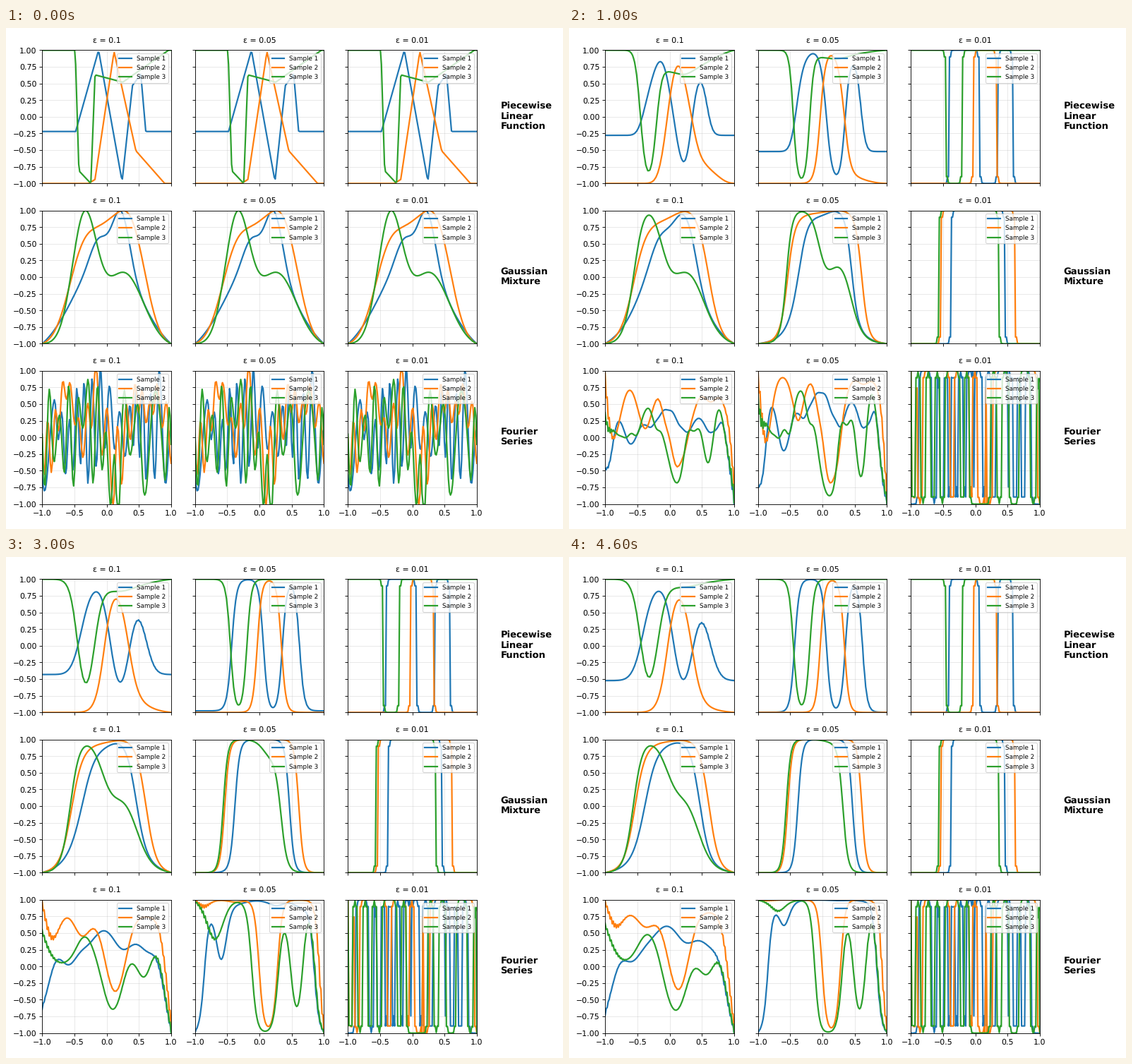
Recreate the animation shown at these times as a matplotlib script. Size 789x710 px, loop 5000 ms.

```python
import numpy as np
import matplotlib.pyplot as plt
from matplotlib.animation import FuncAnimation

W, H, DPI = 789, 710, 78.9
EPS = [0.1, 0.05, 0.01]
NAMES = ["Piecewise\nLinear\nFunction", "Gaussian\nMixture", "Fourier\nSeries"]
STEPS, DT = 100, 2.5e-5
X = np.linspace(-1, 1, 128)
DX = X[1] - X[0]


def linear(*points):
    return np.interp(X, *zip(*points))


def eased(*points):
    """Ease in and out between a few turning points."""
    xs, ys = np.transpose(points)
    pos = np.interp(X, xs, np.arange(len(xs)))
    t = pos % 1
    return np.interp(np.floor(pos) + t * t * (3 - 2 * t), np.arange(len(ys)), ys)


def mixture(*parts):
    """Sum of (weight, centre, width) bells, scaled to [-1, 1], -1 at both ends."""
    v = sum(w * np.exp(-((X - c) / s) ** 2 / 2) for w, c, s in parts)
    v = v - linear((-1, v[0]), (1, v[-1]))
    return 2 * v / v.max() - 1


def wave(mid, half_turns, amp, beat, centre, period):
    """Fast oscillation of drifting pitch and beating strength around mid."""
    size = amp + beat * np.cos(2 * np.pi * (X - centre) / period)
    return np.clip(mid - size * np.cos(np.pi * half_turns), -1, 1)


piecewise = [
    linear((-1, -.22), (-.48, -.22), (-.125, 1), (.24, -.97), (.4, .47),
           (.53, .64), (.607, -.22), (1, -.22)),
    linear((-.28, -1), (-.18, -.94), (.115, .98), (.454, -.51), (.9, -1)),
    linear((-.487, 1), (-.43, -.81), (-.245, -1), (-.18, .63), (.25, .52), (.96, 1)),
]
gaussian = [
    mixture((1.55, 0, .5), (.79, .23, .13), (.27, -.14, .12)),
    mixture((1.38, -.35, .24), (1.13, .05, .218), (1.55, .4, .22)),
    mixture((1.88, -.345, .19), (1.1, .27, .3)),
]
fourier = [
    wave(eased((-1, -.4), (-.77, .3), (-.62, -.2), (-.4, .25), (-.31, .05),
               (-.06, .4), (.28, .02), (.46, .3), (.67, -.05), (.82, .3), (1, -.4)),
         linear((-1, -.4), (-.95, 0), (-.81, 1), (-.29, 10), (-.03, 14),
                (.36, 19), (.61, 24), (.815, 27), (1, 29)),
         .53, .22, .75, 1),
    wave(eased((-1, 0), (-.9, -.2), (-.62, .75), (-.365, -.05), (-.19, .65),
               (.11, -.45), (.5, .6), (.64, .35), (.77, .6), (1, .05)),
         linear((-1, -.5), (-.97, 0), (-.565, 7), (-.17, 13), (.1, 16),
                (.44, 21), (.78, 27), (1, 30)),
         .38, .22, .05, 1.2),
    wave(eased((-1, .05), (-.5, 0), (-.33, .5), (-.18, 0), (-.08, .05),
               (.1, -.8), (.32, .1), (.48, .1), (.61, -.1), (.77, .35), (1, -.35)),
         linear((-1, -.5), (-.96, 0), (-.065, 12), (.175, 16), (.47, 19),
                (.58, 20), (.775, 21), (.9, 22), (1, 23.4)),
         .55, .25, -.56, .39),
]
# Boundary values that drive the Fourier samples once time runs
FOURIER_ENDS = [(-.37, -1), (.95, -.75), (.3, -.97)]


def evolve(u):
    """Allen-Cahn flow u_t = u_xx + (u - u^3) / eps^2, no diffusion at the ends."""
    rate = 1 / np.reshape(EPS, (3, 1, 1, 1)) ** 2
    for _ in range(STEPS):
        p = np.pad(u, [(0, 0)] * 3 + [(2, 2)], mode="edge")
        lap = (p[..., 4:] - 2 * u + p[..., :-4]) / (2 * DX) ** 2
        lap[..., [0, -1]] = 0
        u = u + DT * (lap + rate * (u - u ** 3))
    return u


# states[time][column, row, sample]
start = np.stack([np.array([piecewise, gaussian, fourier])] * 3)
u = start.copy()
u[:, 2, :, 0], u[:, 2, :, -1] = np.transpose(FOURIER_ENDS)
states = [start]
for _ in range(4):
    u = evolve(u)
    states.append(u)

plt.rcParams["text.hinting"] = "none"
fig = plt.figure(figsize=((W + .01) / DPI, (H + .01) / DPI), dpi=DPI,
                 facecolor="white")
AW, AH = 182.7, 188.8
lines = {}
for row in range(3):
    top = 31.5 + 227.2 * row
    for col, eps in enumerate(EPS):
        left = 51.2 + 216.55 * col
        ax = fig.add_axes([left / W, 1 - (top + AH) / H, AW / W, AH / H])
        ax.set(xlim=(-1, 1), ylim=(-1, 1), xticks=np.linspace(-1, 1, 5),
               yticks=np.linspace(-1, 1, 9))
        ax.tick_params(labelbottom=row == 2, labelleft=col == 0)
        ax.grid(True, alpha=0.3)
        ax.set_title(f"ε = {eps}", fontsize=10, pad=10)
        for s in range(3):
            lines[col, row, s], = ax.plot(X, start[col, row, s], lw=2,
                                          label=f"Sample {s + 1}")
        ax.legend(loc="upper right", fontsize=8)
    fig.text(700.3 / W, 1 - (top + AH / 2) / H, NAMES[row], fontsize=12,
             fontweight="bold", ha="left", va="center")


def update(k):
    for key, line in lines.items():
        line.set_ydata(states[k][key])
    return list(lines.values())


anim = FuncAnimation(fig, update, frames=5, interval=1000, repeat=True,
                     repeat_delay=0, blit=False)
plt.show()
```
